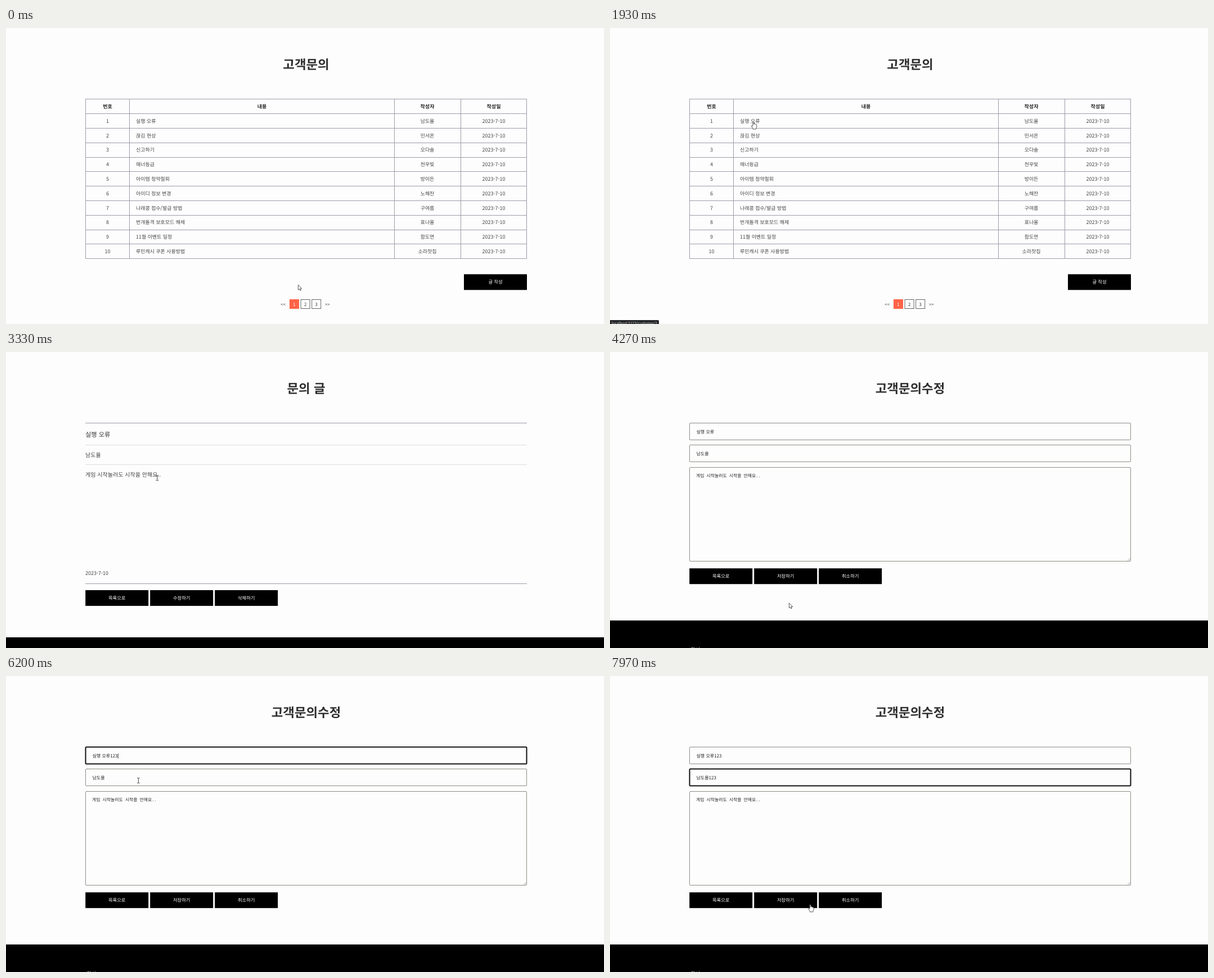
Write an HTML page that moves like this. It is 1063 px wide and 527 px high and loops after 8 s.

```html
<!DOCTYPE html>
<html lang="ko">
<head>
<meta charset="utf-8">
<style>
html, body { margin: 0; width: 100%; height: 100%; overflow: hidden; background: #fdfdfd; }
svg { display: block; width: 1063px; height: 527px; text-rendering: geometricPrecision; }
text { font-family: 'Noto Sans CJK KR', 'Noto Sans KR', 'Noto Sans CJK', sans-serif; white-space: pre; }
.mono { font-family: 'Noto Sans Mono CJK KR', 'Noto Sans CJK KR', monospace; }
</style>
</head>
<body>
<svg id="stage" viewBox="0 0 1063 527"></svg>
<script>
const stage = document.getElementById('stage');
const LINE = '#9c9caa', PALE = '#dedee6', FIELD = '#8c8c86', INK = '#444';

function add(parent, tag, attrs, content) {
  const el = document.createElementNS('http://www.w3.org/2000/svg', tag);
  for (const k in attrs) el.setAttribute(k, attrs[k]);
  if (content) el.textContent = content;
  return parent.appendChild(el);
}
const group = parent => add(parent, 'g', {});
const rect = (g, x, y, width, height, fill, more) => add(g, 'rect', { x, y, width, height, fill, ...more });
const hline = (g, y, color) => rect(g, 141, y, 785, 1, color);

// y is the vertical middle of the text
const text = (g, s, x, y, size, fill = INK, more = {}) =>
  add(g, 'text', { x, y: y + size * 0.37, 'font-size': size, fill, ...more }, s);
const mid = (g, s, x, y, size, fill, more) => text(g, s, x, y, size, fill, { 'text-anchor': 'middle', ...more });
const heading = (g, s) => mid(g, s, 533.5, 64.5, 22.4, '#2e2e2e', { 'font-weight': 700 });

function button(g, label, x, y) {
  rect(g, x, y, 112, 28, '#000');
  mid(g, label, x + 56, y + 14, 8.3, '#fff');
}
const buttons = (g, labels, y) => labels.forEach((s, i) => button(g, s, 141.2 + i * 115, y));

// List page
const list = group(stage);
heading(list, '고객문의');
const rows = [
  ['실행 오류', '남도율'], ['끊김 현상', '민서온'], ['신고하기', '오다솔'], ['매너등급', '천우빛'],
  ['아이템 청약철회', '방이든'], ['아이디 정보 변경', '노해찬'], ['나래콩 접수/발급 방법', '구여름'],
  ['번개돌격 보호모드 해제', '표나울'], ['11월 이벤트 일정', '함도연'], ['루민캐시 쿠폰 사용방법', '소라찻집']
];
for (let i = 0; i < 12; i++) hline(list, Math.round(126.3 + 25.8 * i), LINE);
for (const x of [141, 219, 690, 808, 925]) rect(list, x, 126, 1, 284, LINE);
['번호', '내용', '작성자', '작성일'].forEach((s, i) =>
  mid(list, s, [180.5, 455, 749, 867][i], 139.6, 9, '#222', { 'font-weight': 700 }));
rows.forEach(([title, name], i) => {
  const y = 165.4 + 25.8 * i;
  mid(list, i + 1, 180.5, y, 8.95);
  text(list, title, 231, y, 8.95);
  mid(list, name, 749, y, 8.95);
  mid(list, '2023-7-10', 867, y, 8.95);
});
button(list, '글 작성', 814, 438.4);
mid(list, '<<', 492.7, 491.8, 7.8);
mid(list, '>>', 571.3, 491.8, 7.8);
for (let i = 0; i < 3; i++) {
  const x = 504.5 + i * 19.6;
  rect(list, x, 483.5, 16, 16, i ? 'none' : '#ff6347', { stroke: i ? '#666' : '#ff6347' });
  mid(list, i + 1, x + 8, 491.8, 7.8, i ? '#333' : '#fff');
}

// Detail page
const detail = group(stage);
heading(detail, '문의 글');
hline(detail, 126, LINE);
hline(detail, 165, PALE);
hline(detail, 200, PALE);
hline(detail, 412, LINE);
text(detail, rows[0][0], 141, 147.3, 11.2, '#333', { 'font-weight': 500 });
text(detail, rows[0][1], 141, 183.3, 10);
text(detail, '게임 시작눌러도 시작을 안해요..', 141, 218, 10.05);
text(detail, '2023-7-10', 141, 393.7, 8.95);
buttons(detail, ['목록으로', '수정하기', '삭제하기'], 424);
rect(detail, 0, 508, 1063, 19, '#000');

// Edit page
const edit = group(stage);
heading(edit, '고객문의수정');
const box = (y, h) => rect(edit, 141.5, y + 0.5, 784, h, 'none', { rx: 1.5, stroke: FIELD });
const fields = [
  { value: rows[0][0], y: 126, from: 5170, to: 6600, keys: [5430, 5580, 5730] },
  { value: rows[0][1], y: 165, from: 6600, to: 8000, keys: [6870, 7000, 7130] }
];
for (const f of fields) {
  f.box = box(f.y, 30);
  f.text = text(edit, f.value, 153.5, f.y + 16.2, 8, '#222');
  f.caret = rect(edit, 0, f.y + 12, 0.8, 9, '#111');
}
box(205, 167);
text(edit, '게임 시작눌러도 시작을 안해요..', 153, 220.4, 7.9, '#222', { class: 'mono' });
add(edit, 'path', { d: 'M920 371.5l4.5-4.5M922.5 371.5l2-2', stroke: '#888', 'stroke-width': 0.7 });
buttons(edit, ['목록으로', '저장하기', '취소하기'], 385.2);
rect(edit, 0, 478, 1063, 49, '#000');
text(edit, '회사', 143, 529.3, 9.5, '#aaa');

// Link address at the bottom left
const status = group(stage);
rect(status, -3, 520, 90, 12, '#25262a', { rx: 2 });
text(status, 'localhost:5173/customer/1', 3, 525.8, 6.5, '#d0d0d0');

// Pointers, drawn around their hot spot
const pointer = group(stage);
const outline = { fill: '#fff', stroke: '#333', 'stroke-width': 0.8, 'stroke-linejoin': 'round' };
const shapes = {
  arrow: add(pointer, 'path', { d: 'M.4.4V9.3L2.5 7.5 3.9 10.5 5.3 9.9 4 7H6.7Z', ...outline }),
  hand: add(pointer, 'path', {
    d: 'M-.9 7.5V.6Q0-.8.9.6V4.2Q2-.0 2.7 4.5 3.8 3.7 4.4 5 5.8 4.4 6.1 6V9L4.9 11.2V13H-.7V11.6L-3.4 7.9Q-3.2 6.2-1.8 7Z', ...outline
  }),
  beam: add(pointer, 'path', {
    d: 'M-2.3-4.5H-.6L0-4 .6-4.5H2.3M0-4V4M-2.3 4.5H-.6L0 4 .6 4.5H2.3',
    fill: 'none', stroke: '#333', 'stroke-width': 0.9
  })
};

// Pointer path: time, x, y
const path = [
  [0, 519, 457], [180, 519, 457], [630, 387, 362], [750, 387, 362], [1470, 262, 182], [1650, 262, 182],
  [1930, 254.7, 167], [2780, 254.7, 167], [3030, 250, 147], [3190, 250, 147], [3330, 268.6, 223.5],
  [3640, 338, 488], [3970, 318, 446.5], [4270, 318, 446.5], [4730, 258.6, 174.3], [5070, 226, 144],
  [5950, 226, 144], [6200, 235.3, 186], [6500, 233, 184], [7250, 233, 184], [7630, 330, 358],
  [7960, 356, 407], [8000, 356, 407]
];

// Speed at a key; zero beside a rest
function slope(i, k) {
  const a = path[i - 1], b = path[i], c = path[i + 1];
  if (!a || !c || a[k] === b[k] || b[k] === c[k]) return 0;
  return (c[k] - a[k]) / (c[0] - a[0]);
}
function along(t, k) {
  const i = path.findIndex(p => p[0] > t) - 1;
  const a = path[i], b = path[i + 1], d = b[0] - a[0], u = (t - a[0]) / d, v = 1 - u;
  return a[k] * (1 + 2 * u) * v * v + b[k] * u * u * (3 - 2 * u) +
    d * u * v * (slope(i, k) * v - slope(i + 1, k) * u);
}

function pointerShape(page, x, y) {
  const within = (x0, y0, x1, y1) => x >= x0 && x <= x1 && y >= y0 && y <= y1;
  if (page === list) return within(231, 160, 267, 172) ? 'hand' : 'arrow';
  if (page === detail) {
    if (within(256, 424, 368, 452)) return 'hand';
    return y < 155 || within(141, 176, 926, 228) ? 'beam' : 'arrow';
  }
  if (within(141, 385, 483, 413)) return 'hand';
  return within(141, 126, 926, 157) || within(141, 165, 926, 196) || within(141, 205, 926, 373) ? 'beam' : 'arrow';
}

const show = (el, on) => { el.style.display = on ? '' : 'none'; };
const ramp = (t, a, b) => Math.min(1, Math.max(0, (t - a) / (b - a)));

function drawField(f, t) {
  const focus = t >= f.from && t < f.to;
  const typed = f.keys.filter(k => t >= k).length;
  const since = t - (typed ? f.keys[typed - 1] : f.from);
  f.box.setAttribute('stroke', focus ? '#101010' : FIELD);
  f.box.setAttribute('stroke-width', focus ? 2 : 1);
  f.text.textContent = f.value + '123'.slice(0, typed);
  show(f.caret, focus && since % 1000 < 500);
  f.caret.setAttribute('x', 153.8 + f.text.getComputedTextLength());
}

function draw(now) {
  const t = now % 8000;
  const page = t < 2500 ? list : t < 4270 ? detail : edit;
  for (const p of [list, detail, edit]) show(p, p === page);
  if (page === edit) fields.forEach(f => drawField(f, t));
  status.setAttribute('opacity', ramp(t, 1760, 1900) * (1 - ramp(t, 2800, 3030)));
  const x = along(t, 1), y = along(t, 2), shape = pointerShape(page, x, y);
  pointer.setAttribute('transform', `translate(${x} ${y})`);
  for (const s in shapes) show(shapes[s], s === shape);
}

const start = performance.now();
(function loop() {
  draw(performance.now() - start);
  requestAnimationFrame(loop);
})();
</script>
</body>
</html>
```
